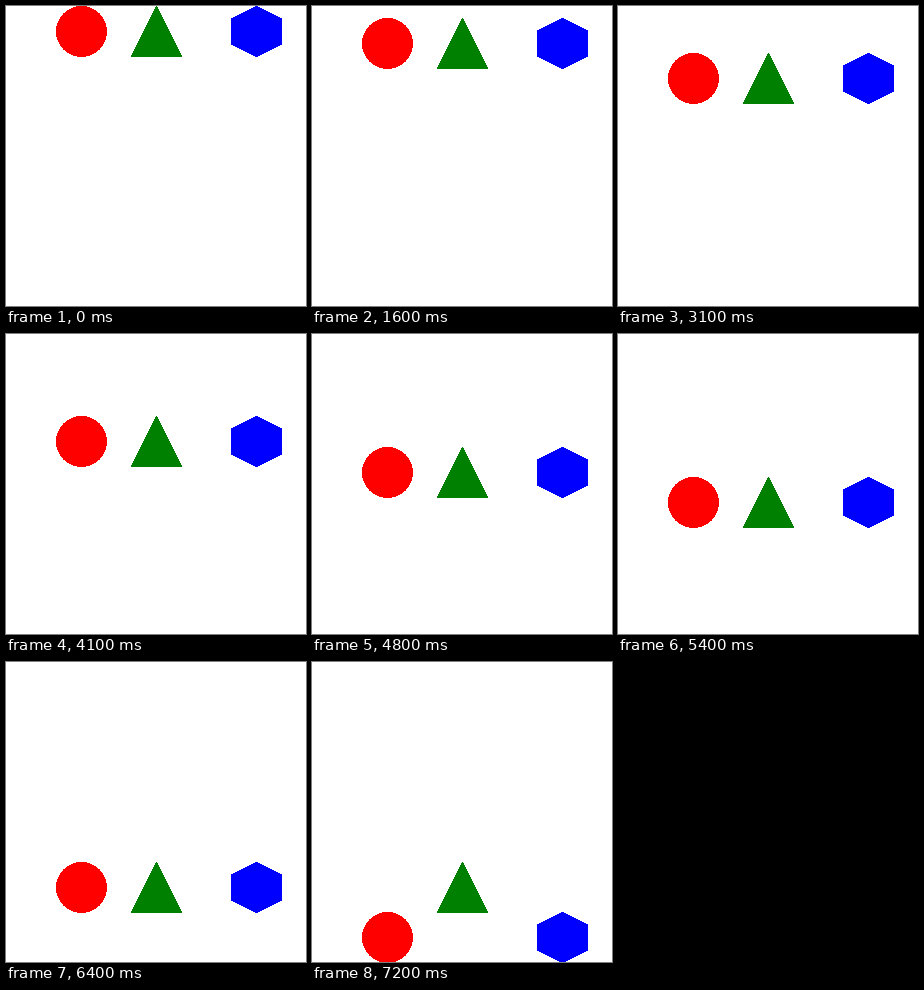
Write an HTML page that moves like this. It is 300 px wide and 300 px high and loops after 10 s.

```html
<!DOCTYPE html>
<html lang="en">
<head>
<meta charset="utf-8">
<title>Falling shapes</title>
<style>
  html, body { margin: 0; width: 100%; height: 100%; overflow: hidden; background: #fff; }
  svg { display: block; }
  polygon { stroke-width: 1; stroke-linejoin: round; }
</style>
</head>
<body>
<svg width="300" height="300" viewBox="0 0 300 300" shape-rendering="crispEdges">
  <circle id="circle" cx="75.5" cy="25.5" r="25.5" fill="#f00"/>
  <polygon id="triangle" points="150.5,.5 125.5,50.5 175.5,50.5" fill="#008000" stroke="#008000"/>
  <polygon id="hexagon" points="250.5,.5 275.5,13 275.5,38 250.5,50.5 225.5,38 225.5,13" fill="#00f" stroke="#00f"/>
</svg>
<script>
  const LOOP = 10000, STEP = 100, GRAVITY = 9.81;
  // Each shape falls freely until its top reaches its resting height.
  const bodies = [['circle', 250], ['triangle', 200], ['hexagon', 250]]
    .map(([id, rest]) => ({ node: document.getElementById(id), rest }));

  function draw(now) {
    const seconds = Math.floor((now % LOOP) / STEP) * STEP / 1000;
    const fall = Math.floor(GRAVITY * seconds ** 2 / 2);
    for (const { node, rest } of bodies) {
      node.setAttribute('transform', `translate(0 ${Math.min(fall, rest)})`);
    }
  }

  let start;
  function tick(now) {
    start ??= now;
    draw(now - start);
    requestAnimationFrame(tick);
  }
  draw(0);
  requestAnimationFrame(tick);
</script>
</body>
</html>
```
